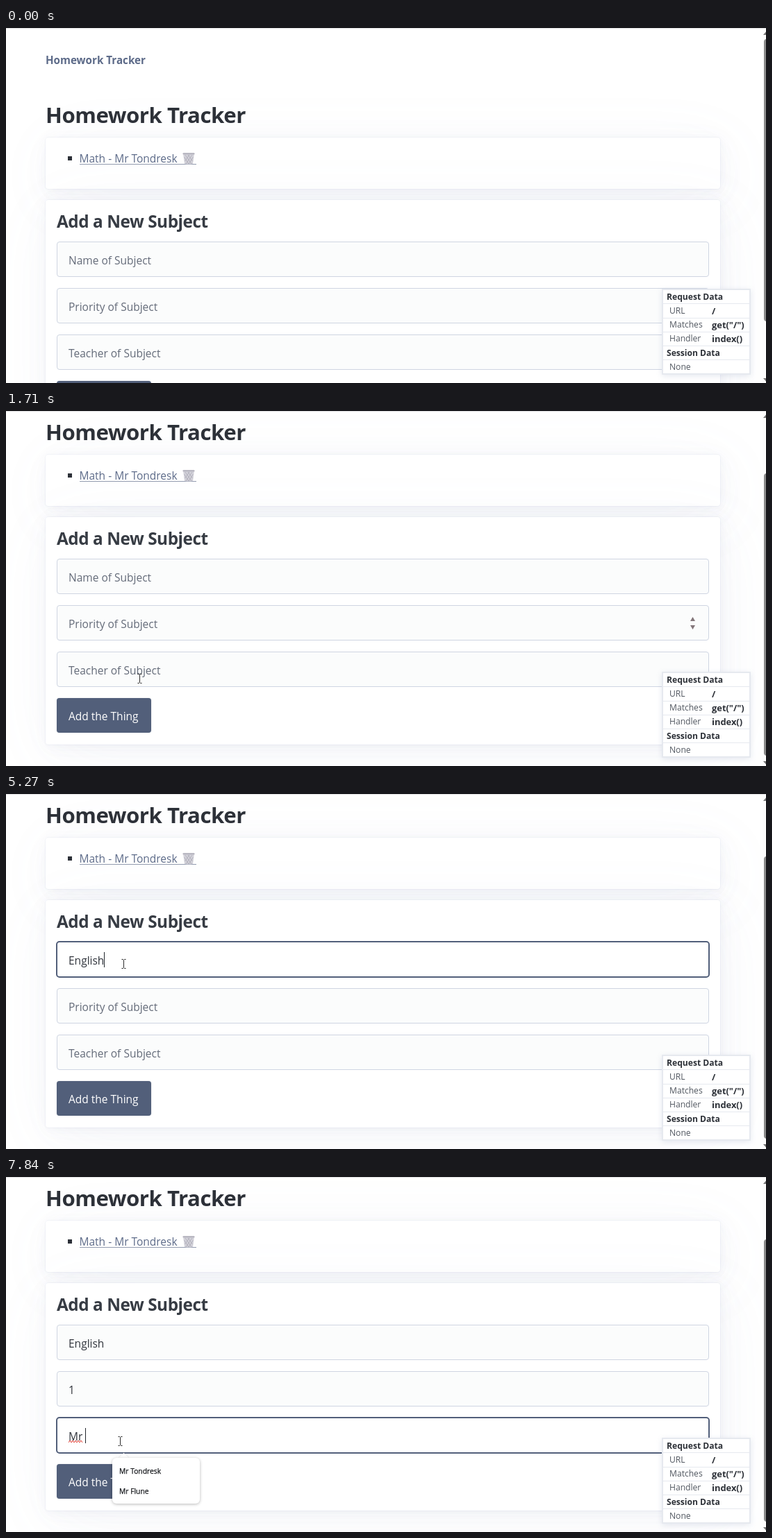
Recreate the animation shown at these times as an HTML page. Size 1094 by 512 pixels, loop 8000 ms.

```html
<!DOCTYPE html>
<html lang="en">
<head>
<meta charset="utf-8">
<title>Homework Tracker</title>
<style>
html, body { margin: 0; width: 100%; height: 100%; overflow: hidden; background: #fff; }
body { position: relative; font: 15.5px "Open Sans", "Noto Sans", sans-serif; color: #373c44; }
div, span, svg { position: absolute; box-sizing: border-box; }
#stage { left: 0; top: 0; width: 1094px; height: 512px; overflow: hidden; }
#page { left: 0; top: 0; width: 1094px; height: 512px; }

/* --x is the left edge and --y the baseline of a line of text */
.t { left: calc(var(--x) * 1px); top: calc(var(--y) * 1px); margin-top: -.388em; line-height: 0; white-space: pre; }
.nav { font-size: 15.2px; font-weight: 700; color: #5d6b89; }
.h1 { font-size: 31.2px; font-weight: 700; letter-spacing: -.015em; color: #2d3138; }
.h2 { font-size: 24.3px; font-weight: 700; letter-spacing: -.018em; color: #373c44; }
.link { color: #5d6b89; }
.hint { color: #646b79; }
.val { color: #30343c; }

.card {
  left: 57px; width: 971px; border-radius: 4px; background: #fff;
  box-shadow: 0 0 3px rgba(129,145,181,.017), 1px 1px 7px rgba(129,145,181,.024),
    1px 2px 13px rgba(129,145,181,.03), 2px 4px 23px rgba(129,145,181,.036),
    3px 7px 42px rgba(129,145,181,.043), 8px 16px 100px rgba(129,145,181,.06),
    0 0 0 1px rgba(129,145,181,.06);
}
.field { left: 73px; width: 939px; height: 51px; border: 1px solid #cfd5e2; border-radius: 4px; background: #fbfcfc; }
.ring { inset: -2px; border: 2px solid #525f7a; border-radius: 5px; background: #fff; opacity: 0; }
.button { left: 73px; top: 414px; width: 136px; height: 50px; border-radius: 4px; background: #525f7a; box-shadow: 0 0 1px rgba(82,95,122,.5); }
#caret { width: 1px; height: 22px; background: #22262c; }

#pop { left: 153px; width: 126px; }
#pop .box { inset: 0; border-radius: 6px; background: #fff; overflow: hidden; box-shadow: 0 1px 4px rgba(0,0,0,.28); }
#pop .tip { left: 11px; top: -5px; width: 11px; height: 11px; background: #fff; transform: rotate(45deg); box-shadow: -1px -1px 1px rgba(0,0,0,.06); }
#pop .t { font-size: 10.3px; color: #16181c; -webkit-text-stroke: .25px #16181c; }

#panel { left: 944px; top: 376px; width: 128px; height: 124px; background: #fff; border: 2px solid #e6e9ef; box-shadow: 0 2px 8px rgba(129,145,181,.2); }
.line { left: 946px; width: 124px; height: 1px; background: #e6e9ef; }
.row { font-size: 12.1px; color: #50565f; }
.row.strong { font-weight: 700; color: #2d3138; }
.row.code { font-size: 12.9px; }

#thumb { left: 1091px; top: 16px; width: 9px; height: 407px; border-radius: 4px; background: #8a8a8a; }
</style>
</head>
<body>
<div id="stage">
  <div id="page">
    <span class="t nav" style="--x:57;--y:-43">Homework Tracker</span>
    <span class="t h1" style="--x:57;--y:42">Homework Tracker</span>

    <div class="card" style="top:63px;height:74px"></div>
    <div style="left:89px;top:90px;width:6px;height:6px;background:#2d3138"></div>
    <span class="t link" style="--x:105.5;--y:99">Math - Mr Tondresk</span>
    <div style="left:106px;top:101px;width:168px;height:1px;background:#939cb0"></div>
    <svg style="left:253px;top:84px" width="20" height="18" viewBox="0 0 20 18">
      <path d="M2 2H18L16 17Q10 18 4 17Z" fill="#d3d2da"/>
      <path d="M5 4 14 17M9 4 15.500 13M3.500 7 10 17M15 4 6 17M11 4 4.500 13M16.500 7 10 17" stroke="#aeacb8" stroke-width=".8" fill="none"/>
      <rect x="1.500" y="1" width="17" height="2.500" rx="1.200" fill="#b9b8c2"/>
    </svg>

    <div class="card" style="top:153px;height:328px"></div>
    <span class="t h2" style="--x:73;--y:193">Add a New Subject</span>
    <div id="form"></div>
    <svg id="spin" style="left:984px;top:295.500px" width="9" height="20"><path d="M4.500 1 8 7H1ZM1 13H8L4.500 19Z" fill="#83767a"/></svg>
    <svg id="squiggle" style="left:90px;top:379px" width="22" height="5"><path fill="none" stroke="#e2453c" stroke-width="1"/></svg>
    <div id="caret"></div>
    <div class="button"></div>
    <span class="t" style="--x:90;--y:445.500;color:#fff">Add the Thing</span>
    <div id="pop"><div class="tip"></div><div class="box"></div></div>
  </div>

  <div id="panel"></div>
  <div id="rows"></div>

  <div style="left:1089px;top:1px;width:5px;height:511px;background:#fcfcfc"></div>
  <div id="thumb"></div>
  <svg style="left:1090px;top:0" width="10" height="512"><path d="M0 10 5 4 10 10ZM0 505H10L5 511Z" fill="#777"/></svg>
  <div style="left:0;top:0;width:1094px;height:1px;background:#e2e2e4"></div>
  <svg id="pointer" width="7" height="14"><path d="M.5 .5H2.500L3.500 1.500 4.500 .5H6.500M3.500 1.500V12.500M.5 13.500H2.500L3.500 12.500 4.500 13.500H6.500" fill="none" stroke="#2b2b2b"/></svg>
</div>

<script>
const LOOP = 8000, TICK = 70, MAX_SCROLL = 95;
const $ = id => document.getElementById(id);

function add(parent, cls, text = '') {
  const el = document.createElement(text === null ? 'div' : 'span');
  el.className = cls;
  el.textContent = text;
  return parent.appendChild(el);
}
function label(parent, cls, x, y, text) {
  const el = add(parent, 't ' + cls, text);
  el.style.setProperty('--x', x);
  el.style.setProperty('--y', y);
  return el;
}

// focus and blur times, and the time of each keystroke
const fields = [
  { hint: 'Name of Subject', top: 213, on: 2510, off: 6040, text: 'English', keys: [3710, 3990, 4120, 4250, 4480, 4580, 5120] },
  { hint: 'Priority of Subject', top: 280, on: 6040, off: 7120, text: '1', keys: [6640] },
  { hint: 'Teacher of Subject', top: 347, on: 7120, off: LOOP, text: 'Mr ', keys: [7570, 7710, 7840] }
];
for (const f of fields) {
  const box = add($('form'), 'field', null);
  box.style.top = f.top + 'px';
  f.ring = add(box, 'ring', null);
  f.hintEl = label($('form'), 'hint', 90, f.top + 32.5, f.hint);
  f.valEl = label($('form'), 'val', 90, f.top + 32.5, '');
}

const menus = [
  { top: 271, on: 2660, off: 5270, cut: 3790, items: ['English', 'Math'] },
  { top: 405, on: 7270, off: LOOP + 80, cut: 7780, items: ['Mr Tondresk', 'Mr Flune', 'Ms Orrel'] }
];
const popBox = document.querySelector('#pop .box');
const options = [0, 1, 2].map(i => label(popBox, '', 10, 22.5 + 29 * i, ''));

const rows = [['Request Data'], ['URL', '/'], ['Matches', 'get("/")'], ['Handler', 'index()'], ['Session Data'], ['None']];
rows.forEach(([name, code], i) => {
  const y = 392.5 + 20.2 * i, head = i % 4 === 0;
  label($('rows'), head ? 'row strong' : 'row', head ? 951 : 955, y, name);
  if (code) label($('rows'), 'row strong code', 1016, y, code);
  if (i) add($('rows'), 'line', null).style.top = Math.round(377.2 + 20.2 * i) + 'px';
});

$('squiggle').firstChild.setAttribute('d', 'M0 4' + 'l2 -3 2 3'.repeat(5));

const clamp = v => Math.min(1, Math.max(0, v));
const within = (t, spans) => spans.some(([a, b]) => t >= a && t < b);

// progress in even ticks; the first tick already moves
function steps(t, from, to) {
  if (t < from) return 0;
  const n = Math.round((to - from) / TICK) + 1;
  return clamp((Math.floor((t - from) / TICK) + 1) / n);
}

// start, end, x, y
const moves = [
  [390, 390, 810, 368], [550, 690, 513, 378], [950, 1030, 192, 386],
  [1840, 2250, 169, 245], [5630, 5980, 166, 318], [6700, 7000, 164, 381]
];
function pointerAt(t) {
  let [, , x, y] = moves[0];
  for (const [from, to, nx, ny] of moves) {
    const p = steps(t, from, to);
    x += (nx - x) * p;
    y += (ny - y) * p;
  }
  return [Math.round(x), Math.round(y)];
}

const caretOff = [[3090, 3550], [5040, 5120], [5630, 6040]];
const spinOn = [[690, 2180], [5770, 7120]];
const show = (el, yes) => { el.style.visibility = yes ? 'visible' : 'hidden'; };

function draw(t) {
  const scroll = Math.round(MAX_SCROLL * (1 - (1 - steps(t, 1360, 1710)) ** 1.6));
  $('page').style.transform = `translateY(${MAX_SCROLL - scroll}px)`;
  $('thumb').style.transform = `translateY(${Math.round(scroll * .78)}px)`;

  let active = null;
  for (const f of fields) {
    const typed = f.text.slice(0, f.keys.filter(k => t >= k).length);
    if (f.valEl.textContent !== typed) f.valEl.textContent = typed;
    show(f.hintEl, !typed);
    f.ring.style.opacity = clamp((t - f.on) / 200) * (1 - clamp((t - f.off) / 200));
    if (t >= f.on && t < f.off) active = f;
  }

  show($('caret'), active && !within(t, caretOff));
  if (active) {
    $('caret').style.left = Math.round(90 + active.valEl.getBoundingClientRect().width) + 'px';
    $('caret').style.top = active.top + 15 + 'px';
  }
  show($('spin'), within(t, spinOn));
  show($('squiggle'), t >= 7840);

  const menu = menus.find(m => t >= m.on && t < m.off);
  show($('pop'), menu);
  if (menu) {
    const count = menu.items.length - (t >= menu.cut ? 1 : 0);
    $('pop').style.top = menu.top + 'px';
    $('pop').style.height = 8 + 29 * count + 'px';
    $('pop').style.opacity = clamp((t - menu.on) / 100) * clamp((menu.off - t) / 80);
    options.forEach((el, i) => { el.textContent = i < count ? menu.items[i] : ''; });
  }

  const [x, y] = pointerAt(t);
  show($('pointer'), t >= 390);
  $('pointer').style.left = x - 3 + 'px';
  $('pointer').style.top = y - 7 + 'px';
}

const start = performance.now();
function frame() {
  draw((performance.now() - start) % LOOP);
  requestAnimationFrame(frame);
}
frame();
</script>
</body>
</html>
```
